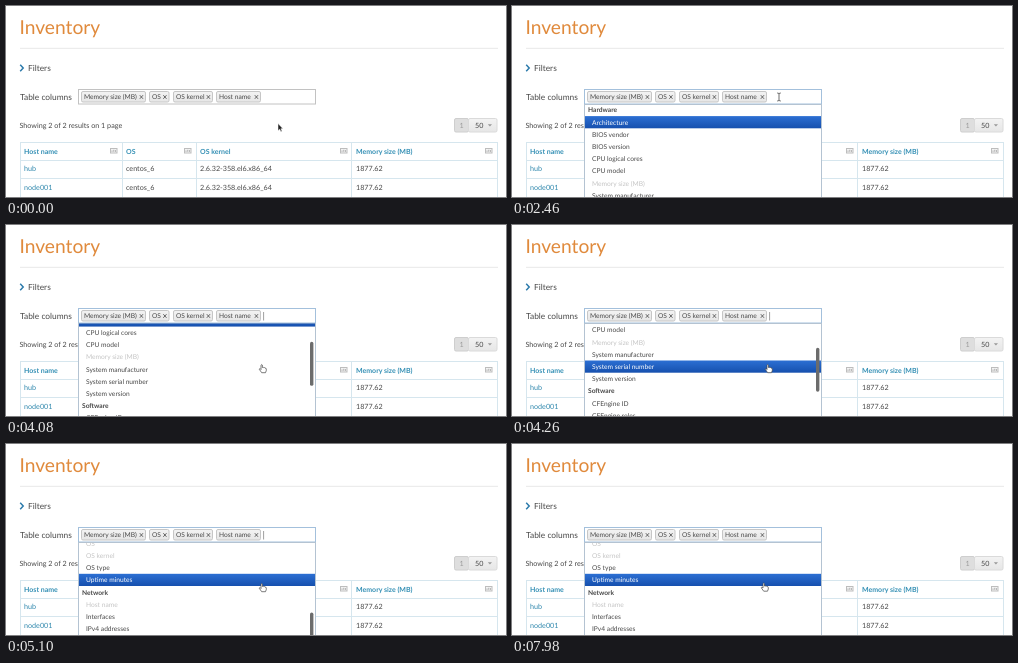
An HTML page for the animation above (8 s loop, 500 by 191 pixels).

```html
<!DOCTYPE html>
<html lang="en">
<head>
<meta charset="utf-8">
<title>Inventory</title>
<style>
  html, body { margin: 0; width: 100%; height: 100%; overflow: hidden; background: #fff; }
  svg { display: block; width: 500px; height: 191px; }
  text { font-family: Lato, "Open Sans", sans-serif; font-size: 7.2px; fill: #484848; text-rendering: geometricPrecision; white-space: pre; }
  .title { font-size: 19.2px; fill: #e08a3c; }
  .label { font-size: 8.4px; }
  .small { font-size: 6.65px; }
  .group { font-weight: 700; }
  .head { font-size: 7px; font-weight: 700; fill: #3590b5; }
  .link { fill: #3088ad; }
  .off { fill: #c4c4c4; }
  .page { fill: #999; }
  .on { fill: #fff; }
</style>
</head>
<body>
<svg viewBox="0 0 500 191">
  <defs>
    <linearGradient id="blue" x2="0" y2="1">
      <stop stop-color="#2c6fd3"/><stop offset="1" stop-color="#1650ae"/>
    </linearGradient>
    <linearGradient id="grey" x2="0" y2="1">
      <stop stop-color="#f3f3f3"/><stop offset="1" stop-color="#e6e6e6"/>
    </linearGradient>
    <clipPath id="listClip"><rect x="72" y="98.5" width="238" height="93"/></clipPath>
  </defs>
  <rect width="500" height="191" fill="#fff"/>
  <g id="page"></g>
  <rect id="field" x="72.5" y="83.5" width="237" height="14.5" fill="#fff"/>
  <g id="tags"></g>
  <path id="caret" d="M257.6 87V95.5" stroke="#777" stroke-width=".7"/>
  <g id="drop">
    <rect x="72.5" y="98.5" width="237" height="100" fill="#fff" stroke="#b4c3d2"/>
    <g clip-path="url(#listClip)"><g id="list">
      <rect id="bar" x="73" width="236" height="12.2" fill="url(#blue)"/>
      <g id="items"></g>
    </g></g>
    <rect id="thumb" x="304" width="3.4" height="44" rx="1.7" fill="#6c6c6c"/>
  </g>
  <g id="cursor">
    <path id="arrow" d="M0 0V7.2L1.7 5.7L2.9 8.3L4.1 7.8L2.9 5.2H5Z" fill="#222" stroke="#fff" stroke-width=".5"/>
    <path id="beam" d="M-1.8-4Q0-4 0-3Q0-4 1.8-4M0-3V3M-1.8 4Q0 4 0 3Q0 4 1.8 4" fill="none" stroke="#444" stroke-width=".8"/>
    <path id="hand" d="M0 .6Q.7-.5 1.4.6V3Q2.4 2.5 2.8 3.2Q3.8 2.8 4.1 3.6Q5.3 3.4 5.3 4.6V6L4.5 8.2H.7L-1.7 4.8Q-1.6 3.8-.6 4.4L0 5Z" fill="#fff" stroke="#444" stroke-width=".7"/>
  </g>
</svg>
<script>
const $ = id => document.getElementById(id);
const text = (x, y, s, cls = "") => `<text x="${x}" y="${y}" class="${cls}">${s}</text>`;
const path = (d, color, w = 1) => `<path d="${d}" fill="none" stroke="${color}" stroke-width="${w}"/>`;
const box = (x, y, w, h, fill, stroke, r = 0) =>
  `<rect x="${x}" y="${y}" width="${w}" height="${h}" rx="${r}" fill="${fill}" stroke="${stroke}"/>`;
const icon = x => box(x + .5, 142.5, 6.5, 4.5, "#f4f4f4", "#bdbdbd") +
  path(`M${x + 2} 145.8V144.5M${x + 3.8} 145.8V143.8M${x + 5.5} 145.8V144.2`, "#999", .8);

const columns = [
  [18, "Host name", 104, "hub", "node001"],
  [120, "OS", 178, "centos_6", "centos_6"],
  [194, "OS kernel", 334, "2.6.32-358.el6.x86_64", "2.6.32-358.el6.x86_64"],
  [350, "Memory size (MB)", 479, "1877.62", "1877.62"]
];
const RULE = "#d6e6ee";
$("page").innerHTML =
  text(13.5, 27.6, "Inventory", "title") +
  path("M14 42.3H492", "#e8e8e8") +
  path("M14.2 58.8L17.2 62L14.2 65.2", "#2b7aab", 1.5) +
  text(22, 64.7, "Filters", "label") +
  text(14, 93.8, "Table columns", "label") +
  text(13.5, 121.6, "Showing 2 of 2 results on 1 page") +
  box(448.5, 112.5, 14, 13.5, "#dedede", "#cecece", 1.5) + text(453.5, 121.8, "1", "page") +
  box(462.5, 112.5, 28.5, 13.5, "url(#grey)", "#dadada", 1.5) + text(469, 121.8, "50") +
  `<path d="M481.8 118.2H486L483.9 120.4Z" fill="#999"/>` +
  box(14.5, 136.5, 477, 60, "#fff", RULE) +
  path("M14 154.5H492M14 172.5H492M116.5 136V191M190.5 136V191M345.5 136V191", RULE) +
  columns.map(([x, head, ix, a, b], i) => text(x, 147.5, head, "head") + icon(ix) +
    text(x, 165.4, a, i ? "" : "link") + text(x, 184.1, b, i ? "" : "link")).join("");

const tags = [[75, 65, "Memory size (MB)"], [143, 20.5, "OS"], [167, 40, "OS kernel"], [210, 45, "Host name"]];
$("tags").innerHTML = tags.map(([x, w, s]) =>
  box(x + .5, 85.5, w - 1, 10.5, "url(#grey)", "#c6c6c6", 1.5) + text(x + 3, 93, s, "small") +
  path(`M${x + w - 6.2} 89.2l3.2 3.6m0-3.6l-3.2 3.6`, "#555", .9)).join("");

const ROW = 12.2, TOP = 104;
const names = ["Hardware", "Architecture", "BIOS vendor", "BIOS version", "CPU logical cores", "CPU model",
  "Memory size (MB)", "System manufacturer", "System serial number", "System version", "Software",
  "CFEngine ID", "CFEngine roles", "CFEngine version", "OS", "OS kernel", "OS type", "Uptime minutes",
  "Network", "Host name", "Interfaces", "IPv4 addresses"];
const groups = ["Hardware", "Software", "Network"];
const taken = tags.map(tag => tag[2]);
const styleOf = s => "small" + (taken.includes(s) ? " off" : groups.includes(s) ? " group" : "");
$("items").innerHTML = names.map((s, i) =>
  text(groups.includes(s) ? 76 : 80, TOP + 2.4 + i * ROW, s, styleOf(s))).join("");
const rows = [...$("items").children];

const clamp = v => Math.max(0, Math.min(1, v));
const ease = v => v * v * (3 - 2 * v);
const moves = [[480, 1080, 267, 91], [2880, 3560, 255, 139.5], [7860, 7960, 251, 139]];
const scrolls = [[3720, 4200, 60], [4300, 4500, 108], [4560, 4930, 175.5]];
const rowAt = (y, s) => Math.round((y - TOP + s) / ROW);
const show = (id, v) => $(id).setAttribute("opacity", +v);

function draw(t) {
  let x = 272, y = 117.5;
  for (const [a, b, tx, ty] of moves) {
    const p = ease(clamp((t - a) / (b - a)));
    x += (tx - x) * p;
    y += (ty - y) * p;
  }
  // The highlight only follows the list once each scroll has settled.
  let scroll = 0, settled = 0;
  for (const [a, b, to] of scrolls) {
    scroll += (to - scroll) * clamp((t - a) / (b - a));
    if (t >= b) settled = to;
  }
  const open = t >= 2040;
  const active = Math.max(1, rowAt(y, settled));
  const under = names[rowAt(y, scroll)];
  const inField = y > 83 && y < 98;
  const hand = open && y >= 110 && !taken.includes(under) && !groups.includes(under);

  show("drop", open);
  show("caret", open && t % 1000 < 450);
  $("field").setAttribute("stroke", open ? "#a3c0dc" : "#c2c2c2");
  $("list").setAttribute("transform", `translate(0 ${-scroll})`);
  $("bar").setAttribute("y", TOP + (active - .5) * ROW);
  rows.forEach((row, i) => row.setAttribute("class", i === active ? "small on" : styleOf(names[i])));
  $("thumb").setAttribute("y", 99 + scroll * .396);
  show("thumb", t < 3720 ? 0 : clamp((5900 - t) / 300));
  $("cursor").setAttribute("transform", `translate(${x} ${y})`);
  show("beam", inField);
  show("hand", hand);
  show("arrow", !inField && !hand);
}

function tick() {
  draw(performance.now() % 8000);
  requestAnimationFrame(tick);
}
tick();
</script>
</body>
</html>
```
